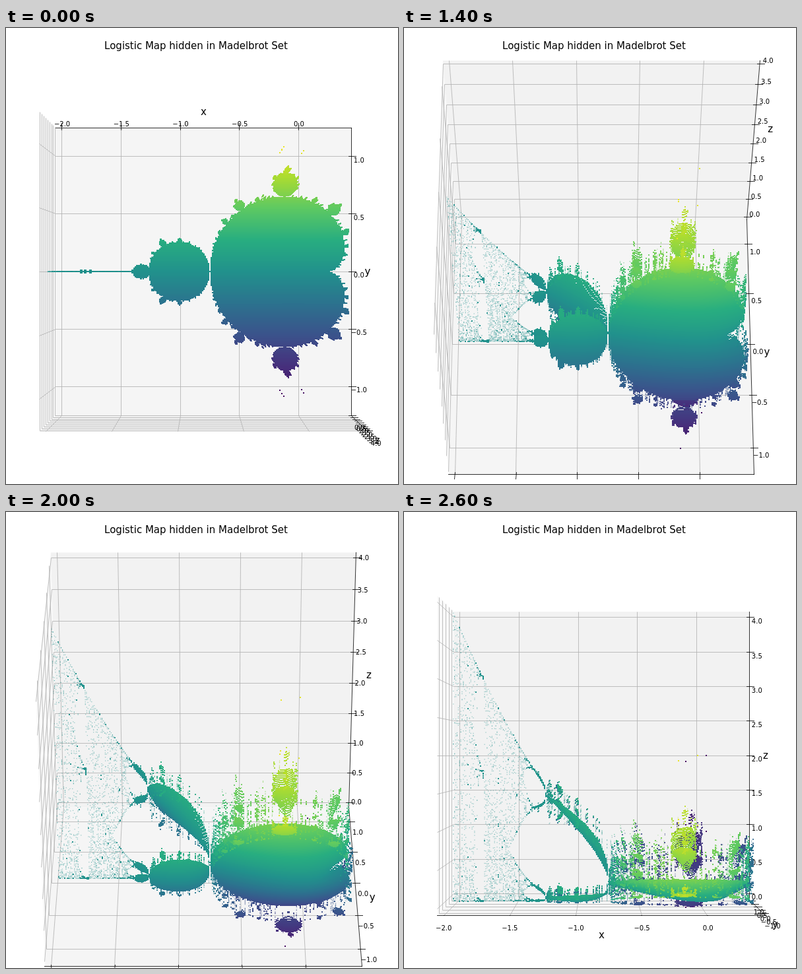
An HTML page with a canvas that plays this animation: 594 px wide and 691 px high, repeating every 6600 ms.

```html
<!DOCTYPE html>
<html lang="en">
<head>
<meta charset="utf-8">
<title>Logistic map</title>
<style>
  html, body { margin: 0; width: 100%; height: 100%; overflow: hidden; background: #fff; }
  svg, canvas { position: absolute; left: 0; top: 0; width: 594px; height: 691px; }
  svg { overflow: hidden; }
  text { font-family: "DejaVu Sans", Verdana, sans-serif; font-size: 10px; text-anchor: middle; fill: #000; }
  .big { font-size: 15px; }
  .grid, .axis { fill: none; stroke-width: .8; }
  .grid { stroke: #b0b0b0; }
  .axis { stroke: #000; stroke-linecap: square; }
</style>
</head>
<body>
<svg id="axes" width="594" height="691" viewBox="0 0 594 691"></svg>
<canvas id="cloud" width="594" height="691"></canvas>
<script>
const start = performance.now();
const svg = document.getElementById('axes');
const ctx = document.getElementById('cloud').getContext('2d');

// Timeline: the camera drops from 90 to 0 degrees in hard steps of 10
const LOOP = 6600, HOLD = 1000, STEP = 200, LAST = 9;

// Scene: each axis is mapped to -0.5 .. 0.5 and seen from a distance of 10
const CX = 299.1, CY = 369.2, SX = 4524.3, SY = 4407.6, DIST = 10;
const MID = [-0.805, 0, 2], SPAN = [2.39, 2.4, 4];
const EDGE = 0.5 + 1 / 48, DELTA = 1 / 12;
const LABEL_PAD = 0.0278, NAME_PAD = 0.0605;

const AXES = [
  { name: 'x', from: -2, to: 0, tickDir: 1, flip: 1 },
  { name: 'y', from: -1, to: 1, tickDir: 0, flip: 0 },
  { name: 'z', from: 0, to: 4, tickDir: 0, flip: 0 }
];
const PANE_FILL = ['#f9f9f9', '#f2f2f2', '#f5f5f5'];

function camera(degrees) {
  const s = Math.sin(degrees * Math.PI / 180);
  const c = Math.cos(degrees * Math.PI / 180);
  return (x, y, z) => {
    const depth = DIST + y * c - z * s;
    return [CX + SX * x / depth, CY - SY * (y * s + z * c) / depth];
  };
}

// Point cloud: |z|^2 along the settled orbit of z -> z^2 + c
const STOPS = ['440154', '472d7b', '3b528b', '2c728e', '21918c', '28ae80', '5ec962', 'addc30', 'fde725']
  .map(h => [0, 2, 4].map(i => parseInt(h.substr(i, 2), 16)));

function viridis(t) {
  const p = Math.max(0, Math.min(1, t)) * (STOPS.length - 1);
  const i = Math.min(STOPS.length - 2, Math.floor(p));
  return `rgb(${STOPS[i].map((v, k) => Math.round(v + (STOPS[i + 1][k] - v) * (p - i)))})`;
}

const SETTLE = 1000, KEEP = 50;

function orbit(cr, ci) {
  const seen = new Map();
  let a = 0, b = 0;
  for (let n = 0; n < SETTLE + KEEP; n++) {
    const next = a * a - b * b + cr;
    b = 2 * a * b + ci;
    a = next;
    const size = a * a + b * b;
    if (size > 5) break;
    if (n < SETTLE) continue;
    const key = Math.round(size * 100);
    const hit = seen.get(key);
    if (hit) hit.count++;
    else seen.set(key, { size, count: 1 });
  }
  return seen.values();
}

const rows = [];
for (let j = -120; j <= 120; j++) {
  const y = j / 100, dots = [];
  for (let i = -199; i <= 39; i++) {
    const x = i / 100;
    for (const { size, count } of orbit(x, y)) {
      dots.push({
        x: (x - MID[0]) / SPAN[0],
        z: (size - MID[2]) / SPAN[2],
        heavy: count > 2,
        alpha: 1 - 0.52 ** count
      });
    }
  }
  if (dots.length) rows.push({ y: y / SPAN[1], color: viridis(0.5 + y / 2.2), dots });
}

function drawCloud(project) {
  ctx.clearRect(0, 0, 594, 691);
  for (const row of rows) {
    ctx.fillStyle = row.color;
    for (const d of row.dots) {
      const [px, py] = project(d.x, row.y, d.z);
      ctx.globalAlpha = d.alpha;
      if (d.heavy) ctx.fillRect(Math.round(px) - 1, Math.round(py) - 1, 2, 2);
      else ctx.fillRect(px - 0.6, py - 0.6, 1.2, 1.2);
    }
  }
}

// Axes box
const snap = v => Math.floor(v) + 0.5;
const line = (cls, pts) =>
  `<polyline class="${cls}" points="${pts.map(p => p.map(snap).join()).join(' ')}"/>`;
const label = (cls, [x, y], drop, s) =>
  `<text class="${cls}" x="${(x + 0.4).toFixed(2)}" y="${Math.round(y + drop)}">${s}</text>`;
const withAt = (p, i, v) => p.map((old, k) => k === i ? v : old);
const pushOut = (p, skip, pad) => p.map((v, k) => k === skip ? v : v + Math.sign(v) * pad);
const number = v => v.toFixed(1).replace('-', '\u2212');

function drawAxes(project, top) {
  const at = p => project(...p);
  const corner = [-EDGE, top ? -EDGE : EDGE, -EDGE];
  let out = '';

  PANE_FILL.forEach((fill, i) => {
    const [u, v] = [0, 1, 2].filter(k => k !== i);
    const pts = [[-1, -1], [1, -1], [1, 1], [-1, 1]]
      .map(([a, b]) => at(withAt(withAt(corner, u, a * EDGE), v, b * EDGE)).join());
    out += `<polygon fill="${fill}" points="${pts.join(' ')}"/>`;
  });

  AXES.forEach((axis, i) => {
    const base = withAt(corner, axis.flip, -corner[axis.flip]);
    const [u, v] = [0, 1, 2].filter(k => k !== i);
    let grid = '', ticks = '', texts = '';
    for (let value = axis.from; value <= axis.to; value += 0.5) {
      const pos = (value - MID[i]) / SPAN[i];
      const c = withAt(corner, i, pos), b = withAt(base, i, pos);
      grid += line('grid', [withAt(c, u, -c[u]), c, withAt(c, v, -c[v])].map(at));
      const d = axis.tickDir, side = Math.sign(b[d]) * DELTA;
      ticks += line('axis', [withAt(b, d, b[d] - 0.1 * side), withAt(b, d, b[d] + 0.2 * side)].map(at));
      texts += label('', at(pushOut(b, i, LABEL_PAD)), 9, number(value));
    }
    const name = pushOut(withAt(base, i, 0), i, NAME_PAD);
    out += grid + line('axis', [withAt(base, i, -EDGE), withAt(base, i, EDGE)].map(at)) +
      ticks + texts + label('big', at(name), 4.6, axis.name);
  });

  svg.innerHTML = out + label('big', [287.6, 32], 0, 'Logistic Map hidden in Madelbrot Set');
}

let shown = -1;
function tick() {
  const t = (performance.now() - start) % LOOP;
  const step = t < HOLD ? 0 : Math.min(LAST, 1 + Math.floor((t - HOLD) / STEP));
  if (step !== shown) {
    shown = step;
    const project = camera(90 - 10 * step);
    drawAxes(project, step === 0);
    drawCloud(project);
  }
  requestAnimationFrame(tick);
}
tick();
</script>
</body>
</html>
```
